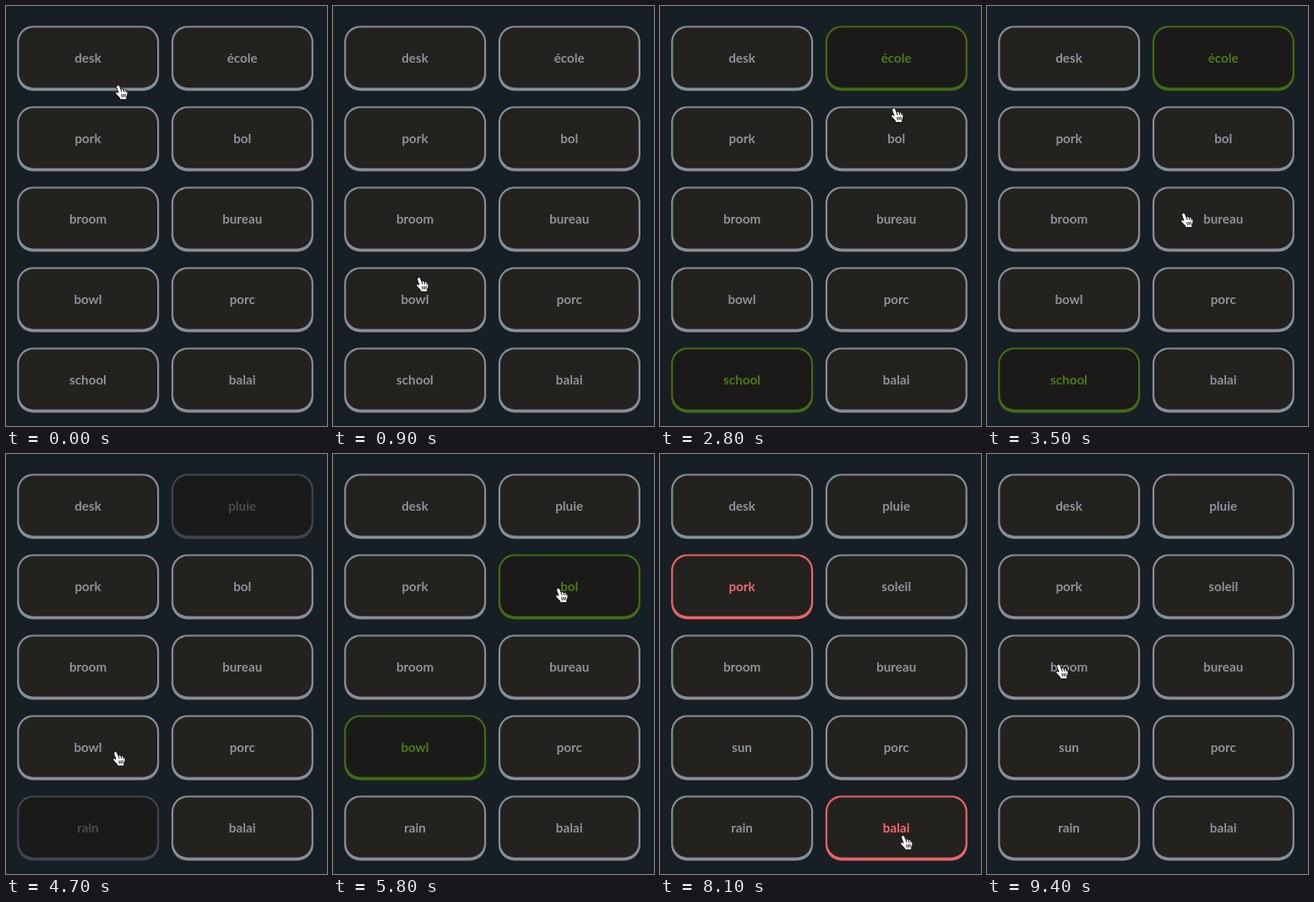
An HTML page for the animation above (9.5 s loop, 380x496 px).

```html
<!DOCTYPE html>
<html lang="en">
<head>
<meta charset="utf-8">
<title>Word match</title>
<style>
  html, body { margin: 0; width: 100%; height: 100%; overflow: hidden; background: #181f24; }
  svg { display: block; width: 380px; height: 496px; }
  text { font: 700 15.2px Lato, "Open Sans", sans-serif; text-anchor: middle; }
</style>
</head>
<body>
<svg viewBox="0 0 380 496">
  <g id="cards"></g>
  <g id="hand" stroke="#0c0e10" stroke-linejoin="round" stroke-linecap="round">
    <path fill="#fff" d="M2 1Q4-.6 5.4 1.4L7 5Q9 4 10 5.6Q12 4.8 12.8 6.6Q14.8 6.4 15 8.8Q15.4 12 13.8 14.2V17.4H6.4Q5.6 15 3 12.8Q.2 10.2.8 8.8Q2 7.6 4 9.4L1.8 3.4Q1.4 1.8 2 1Z"/>
    <path fill="none" d="M7 5l1 3.4M10 5.6l.8 2.8M12.8 6.6l.4 2M7.8 11.4l.6 3M10 11.2l.4 3M12.2 11v3"/>
  </g>
</svg>
<script>
const LOOP = 9500, STEP = 100;
const NS = "http://www.w3.org/2000/svg";

const LOOK = {
  idle: { border: "#858e95", fill: "#24221f", text: "#8d929a" },
  picked: { border: "#4adbe2", fill: "#24221f", text: "#58d6dc" },
  right: { border: "#426b13", fill: "#1b1a19", text: "#4a7b18" },
  wrong: { border: "#e86467", fill: "#24221f", text: "#f0686e" },
  dim: { border: "#3f454a", fill: "#1a1a1a", text: "#484b4f" },
  gone: { border: "#1a1f22", fill: "#191e21", text: "#14181b" }
};

const WORDS = [
  ["desk", "école"], ["pork", "bol"], ["broom", "bureau"],
  ["bowl", "porc"], ["school", "balai"]
];

// Each try picks a left card, then a right one; a match brings new words
const TRIES = [
  { pair: ["school", "école"], pick: 1800, end: 2600, next: ["rain", "pluie"] },
  { pair: ["bowl", "bol"], pick: 4900, end: 5600, next: ["sun", "soleil"] },
  { pair: ["pork", "balai"], pick: 6900, end: 7900 }
];

// Pointer trips; sway bends the way into an S
const HOME = { x: 129, y: 93 };
const TRIPS = [
  { from: 0, to: 300, x: 134, y: 57 },
  { from: 400, to: 1400, x: 106, y: 450, sway: 20 },
  { from: 1700, to: 2400, x: 295, y: 58, sway: 29 },
  { from: 2600, to: 3500, x: 229, y: 244 },
  { from: 3500, to: 4600, x: 126, y: 351 },
  { from: 4900, to: 5500, x: 285, y: 158 },
  { from: 5700, to: 6700, x: 140, y: 157 },
  { from: 6900, to: 7800, x: 284, y: 450 },
  { from: 8200, to: 9200, x: 60, y: 231 },
  { from: 9200, to: 9400, x: 81, y: 248 }
];

const ramp = (t, a, b) => Math.max(0, Math.min(1, (t - a) / (b - a)));
const lerp = (a, b, k) => a + (b - a) * k;
const easeOut = k => 1 - (1 - k) ** 1.6;
const channels = hex => [1, 3, 5].map(i => parseInt(hex.slice(i, i + 2), 16));

function mixColour(a, b, k) {
  const end = channels(b);
  return `rgb(${channels(a).map((v, i) => Math.round(lerp(v, end[i], k))).join()})`;
}

function add(parent, tag, attrs) {
  const el = document.createElementNS(NS, tag);
  for (const key in attrs) el.setAttribute(key, attrs[key]);
  return parent.appendChild(el);
}

function makeCard(word, col, row) {
  const x = 13.2 + col * 182.7, y = 23.4 + row * 95;
  const g = add(document.getElementById("cards"), "g", {});
  return {
    word,
    attempt: TRIES.find(({ pair }) => pair.includes(word)),
    border: add(g, "rect", { x, y, width: 168, height: 76.9, rx: 19 }),
    fill: add(g, "rect", { x: x + 2.2, y: y + 2.2, width: 163.6, height: 70.8, rx: 17 }),
    text: add(g, "text", { x: x + 83.8, y: y + 43.1 })
  };
}

const cards = WORDS.flatMap((pair, row) => pair.map((word, col) => makeCard(word, col, row)));
const hand = document.getElementById("hand");

// Word, the two looks to blend, and the share of the second
function state({ word, attempt }, t) {
  const still = look => [word, look, look, 0];
  if (!attempt) return still(LOOK.idle);
  const { pair, pick, end, next } = attempt;
  const side = pair.indexOf(word), age = t - end;
  if (t < (side ? end : pick)) return still(LOOK.idle);
  if (age < 0) return still(LOOK.picked);
  if (!next) return still(age < 800 ? LOOK.wrong : LOOK.idle);
  if (age < 1800) return [word, LOOK.right, LOOK.gone, ramp(age, 900, 1100)];
  if (age < 2100) return [next[side], LOOK.gone, LOOK.dim, ramp(age, 1800, 2100)];
  return [next[side], LOOK.dim, LOOK.idle, ramp(age, 2100, 2400)];
}

function pointer(t) {
  let { x, y } = HOME;
  for (const trip of TRIPS) {
    if (t < trip.from) break;
    const k = easeOut(ramp(t, trip.from, trip.to));
    x = lerp(x, trip.x, k) + (trip.sway || 0) * Math.sin(2 * Math.PI * k);
    y = lerp(y, trip.y, k);
  }
  return [x, y].map(Math.round);
}

function draw(t) {
  for (const card of cards) {
    const [word, a, b, k] = state(card, t);
    for (const part in a) card[part].setAttribute("fill", mixColour(a[part], b[part], k));
    card.text.textContent = word;
  }
  hand.setAttribute("transform", `translate(${pointer(t)})`);
}

const start = performance.now();
function tick(now) {
  const t = Math.max(0, now - start) % LOOP;
  draw(Math.floor(t / STEP) * STEP);
  requestAnimationFrame(tick);
}
draw(0);
requestAnimationFrame(tick);
</script>
</body>
</html>
```
